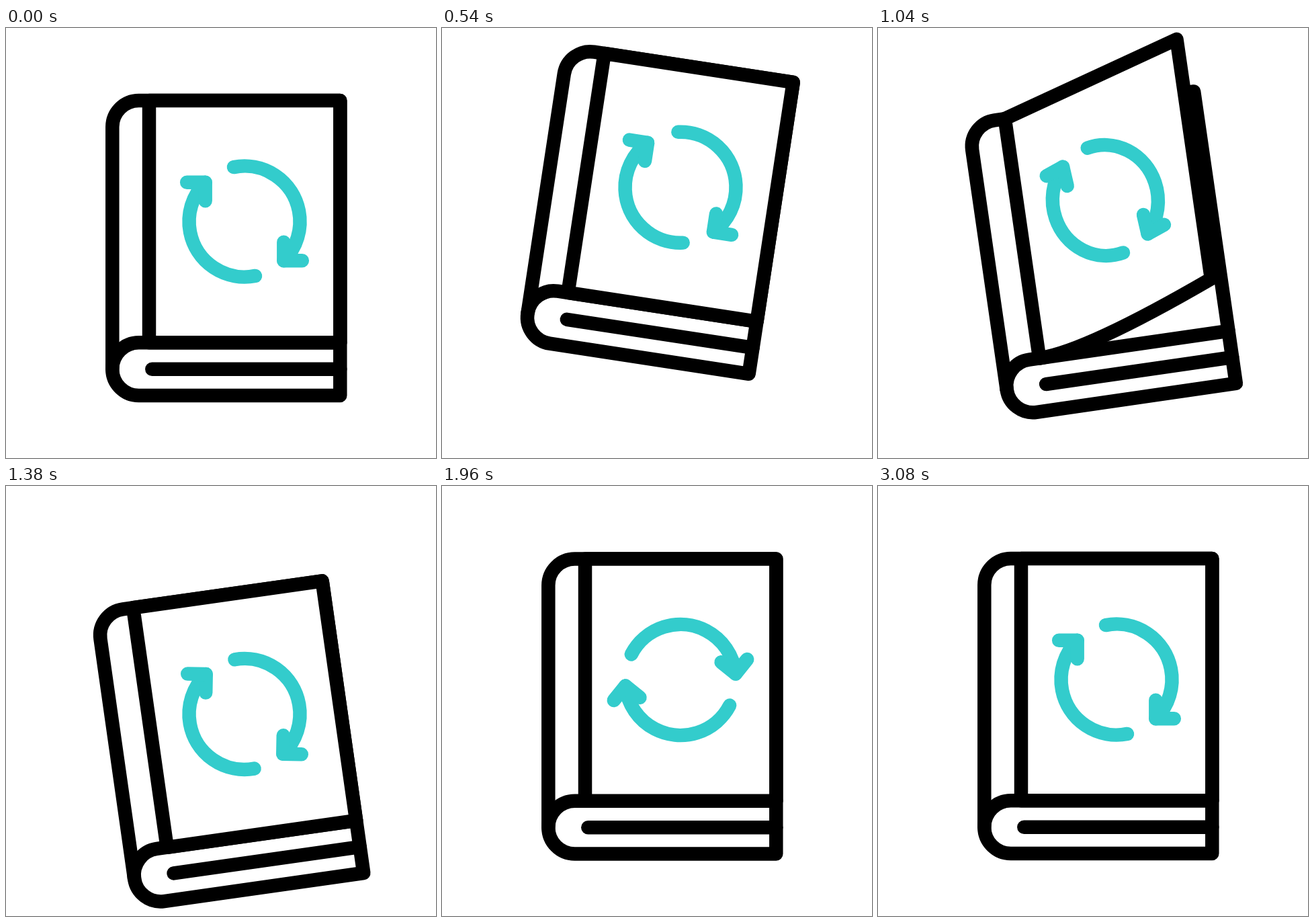
An HTML page with a canvas for the animation above (3.6 s loop, 640 by 640 pixels).

```html
<!DOCTYPE html>
<html lang="en">
<head>
<meta charset="utf-8">
<title>Book</title>
<style>
html, body { margin: 0; width: 100%; height: 100%; overflow: hidden; background: #fff; }
canvas { display: block; width: 640px; height: 640px; }
</style>
</head>
<body>
<canvas id="stage" width="640" height="640"></canvas>
<script>
const ctx = document.getElementById('stage').getContext('2d');
const LOOP = 3600, INK = '#000', TEAL = '#33cccc';
const CX = 355, CY = 288;
const LEFT = 158.3, SPINE = 213, RIGHT = 497.3;
const TOP = 108.1, FOLD = 468.2, PAGES = 507.8, BOTTOM = 547.1, CORNER = 39.3;
const RING = 82.5, BARB = 27.5;

const rad = deg => deg * Math.PI / 180;

// Goes from 0 to 1 between two times, eased at both ends.
function step(t, from, to) {
  const u = Math.min(1, Math.max(0, (t - from) / (to - from)));
  return u * u * (3 - 2 * u);
}

function line(...pts) {
  ctx.beginPath();
  pts.forEach(([x, y]) => ctx.lineTo(x, y));
  ctx.stroke();
}

function drawBook() {
  ctx.beginPath();
  ctx.moveTo(RIGHT, TOP);
  ctx.arcTo(LEFT, TOP, LEFT, BOTTOM, CORNER);
  ctx.arcTo(LEFT, BOTTOM, RIGHT, BOTTOM, CORNER);
  ctx.lineTo(RIGHT, BOTTOM);
  ctx.closePath();
  ctx.stroke();

  ctx.beginPath();
  ctx.moveTo(LEFT, PAGES);
  ctx.arcTo(LEFT, FOLD, RIGHT, FOLD, CORNER);
  ctx.lineTo(RIGHT, FOLD);
  ctx.stroke();
  line([217.3, PAGES], [RIGHT, PAGES]);
}

function drawCover(lift) {
  const x = RIGHT - lift * lift * 0.0022;
  ctx.beginPath();
  ctx.moveTo(SPINE, TOP);
  ctx.lineTo(x, TOP - lift);
  ctx.lineTo(x, FOLD - lift);
  ctx.quadraticCurveTo(SPINE + 70, FOLD, SPINE, FOLD);
  ctx.closePath();
  ctx.fill();
  ctx.stroke();
}

// An arc ending in a square barb; opening narrows the arc and tilts the barb.
function drawArrow(open) {
  const rx = RING * (1 - 0.05 * open);
  const x = rx * Math.SQRT1_2, y = RING * Math.SQRT1_2;
  ctx.beginPath();
  ctx.ellipse(0, 0, rx, RING, 0, rad(-101.2), rad(45));
  ctx.stroke();
  line([x - 2.5 * open, y - BARB - 1.5 * open], [x, y], [x + BARB - 1.5 * open, y - 10 * open]);
}

function drawIcon(open, bounce, spin) {
  ctx.save();
  ctx.translate(CX - 11.5 * open, CY - 39 * open - 5.5 * bounce);
  ctx.transform(1, -0.036 * bounce, 0, 1, 0, 0);
  ctx.rotate(spin);
  ctx.strokeStyle = TEAL;
  drawArrow(open);
  ctx.rotate(Math.PI);
  drawArrow(open);
  ctx.restore();
}

function draw(t) {
  const angle = 8.9 * step(t, 0, 600) - 21.1 * step(t, 667, 1185) + 12.2 * step(t, 1215, 1640);
  const drop = 52.2 * (2 * step(t, 767, 1283) - step(t, 0, 600) - step(t, 1333, 2000));
  const open = step(t, 733, 1067) - step(t, 1067, 1355);
  const bounce = step(t, 1390, 1640) - step(t, 1640, 1900);

  ctx.setTransform(1, 0, 0, 1, 0, 0);
  ctx.fillStyle = '#fff';
  ctx.fillRect(0, 0, 640, 640);
  ctx.lineWidth = 20.5;
  ctx.lineCap = ctx.lineJoin = 'round';
  ctx.strokeStyle = INK;

  ctx.translate(CX, CY + drop);
  ctx.rotate(rad(angle));
  ctx.translate(-CX, -CY);
  drawBook();
  drawCover(82 * open + 19.5 * bounce);
  drawIcon(open, bounce, rad(360 * step(t, 1203, 3080)));
}

function tick() {
  draw(performance.now() % LOOP);
  requestAnimationFrame(tick);
}
tick();
</script>
</body>
</html>
```
